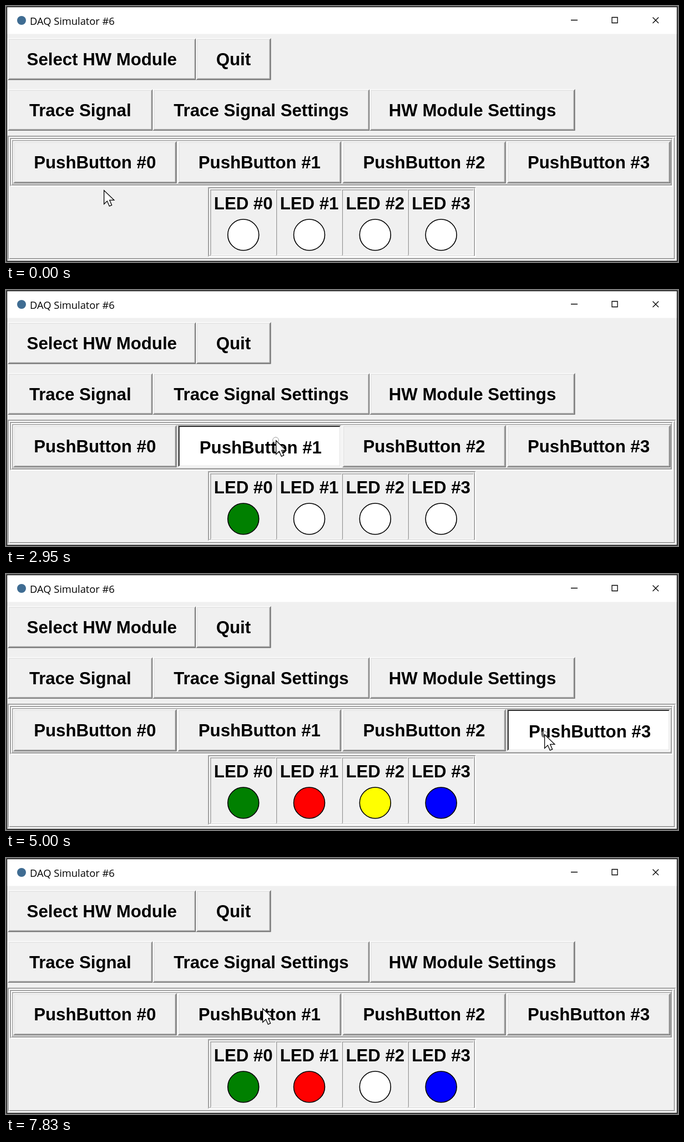
Write an HTML page that moves like this. It is 1211 px wide and 462 px high and loops after 8000 ms.

```html
<!DOCTYPE html>
<html lang="en">
<head>
<meta charset="utf-8">
<title>DAQ Simulator</title>
<style>
  html, body { margin: 0; width: 100%; height: 100%; overflow: hidden; background: #f0f0f0; }
  svg { display: block; width: 100%; height: 100%; }
  .label { font: bold 31.2px "Liberation Sans", Arial, sans-serif; text-anchor: middle; }
  .title { font: 18.3px "Open Sans", "Noto Sans", sans-serif; }
  .led { stroke: #000; stroke-width: 1.6; }
  .glyph { fill: none; stroke: #000; stroke-width: 1.3; }
</style>
</head>
<body>
<svg id="stage" viewBox="0 0 1211 462"></svg>
<script>
const LOOP = 8000;
const GRAY = '#a0a0a0', DARK = '#696969', LIGHT = '#e3e3e3', FACE = '#f0f0f0';
const LED_COLORS = ['#008000', '#ff0000', '#ffff00', '#0000ff'];
const stage = document.getElementById('stage');

// Mitred border of thickness t: one colour top/left, another bottom/right.
function bevel(x, y, w, h, t, topLeft, bottomRight) {
  const r = x + w, b = y + h;
  return `<path fill="${topLeft}" d="M${x} ${b}V${y}H${r}l${-t} ${t}H${x + t}V${b - t}z"/>` +
    `<path fill="${bottomRight}" d="M${r} ${y}V${b}H${x}l${t} ${-t}H${r - t}V${y + t}z"/>`;
}

const groove = (x, y, w, h, t) =>
  bevel(x, y, w, h, t, GRAY, '#fff') + bevel(x + t, y + t, w - 2 * t, h - 2 * t, t, '#fff', GRAY);

const label = (x, y, s) => `<text class="label" x="${x}" y="${y}">${s}</text>`;

function button(x, y, w, h, text, down = false) {
  const t = 1.5, shift = down ? 2 : 0;
  const [outTL, outBR, inTL, inBR] = down
    ? [GRAY, '#fff', '#000', LIGHT]
    : ['#fff', DARK, LIGHT, GRAY];
  return `<rect x="${x}" y="${y}" width="${w}" height="${h}" fill="${down ? '#fff' : FACE}"/>` +
    bevel(x, y, w, h, t, outTL, outBR) +
    bevel(x + t, y + t, w - 2 * t, h - 2 * t, t, inTL, inBR) +
    label(x + w / 2 + shift, y + h / 2 + 11.2 + shift, text);
}

function pushButton(i) {
  const x = 13 + 296.6 * i;
  const make = down => button(x, 244, 294.5, 76, `PushButton #${i}`, down);
  return `<g id="up${i}">${make(false)}</g><g id="down${i}">${make(true)}</g>`;
}

function ledCell(i) {
  const x = 368 + 118.8 * i, cx = x + 59.7;
  return bevel(x, 331, 118.8, 119.5, 1.5, GRAY, '#fff') +
    label(cx, 367, `LED #${i}`) +
    `<circle id="led${i}" class="led" cx="${cx}" cy="413" r="28"/>`;
}

const four = [0, 1, 2, 3];
stage.innerHTML = `
  <rect width="1211" height="462" fill="${FACE}"/>
  <rect width="1211" height="50.5" fill="#fff"/>
  <circle cx="28" cy="26" r="8" fill="#3f6c92"/>
  <text class="title" x="43" y="33.5">DAQ Simulator #6</text>
  <path class="glyph" d="M1018 25.5h12M1092 20.5h10v10h-10zM1165.5 20.5l10.5 10.5m0-10.5l-10.5 10.5"/>
  ${button(3, 58, 339.5, 75.5, 'Select HW Module')}
  ${button(342.5, 58, 135, 75.5, 'Quit')}
  ${button(3, 150, 261.5, 75, 'Trace Signal')}
  ${button(264.5, 150, 391, 75, 'Trace Signal Settings')}
  ${button(655.5, 150, 370, 75, 'HW Module Settings')}
  ${groove(3, 234, 1204.5, 225, 2)}
  ${groove(7, 238, 1195, 88, 2)}
  ${bevel(11, 242, 1188, 81, 1.5, GRAY, GRAY)}
  ${four.map(pushButton).join('')}
  ${groove(364, 327, 483, 126, 2)}
  ${four.map(ledCell).join('')}
  <rect x="1.2" y="1.2" width="1208.6" height="459.6" fill="none" stroke="#222" stroke-width="2"/>
  <g id="cursor">
    <circle id="ring" r="5.3" fill="#fff" fill-opacity=".4" stroke="#999"/>
    <path d="M.6 .8V25.4L6.3 20L10.3 29.2L14.6 27.3L10.7 18.3H18.8z" fill="#fff" stroke="#000" stroke-width="1.3"/>
  </g>`;

const el = id => document.getElementById(id);
const cursor = el('cursor'), ring = el('ring');

// start, last step, number of steps, destination
const START = [176, 332];
const MOVES = [
  [920, 920, 1, 172, 329],
  [1320, 1320, 1, 133, 280],
  [1480, 1480, 1, 132, 279],
  [2340, 2660, 5, 486, 271],
  [3500, 3660, 3, 762, 279],
  [4660, 4830, 3, 970, 289],
  [6340, 6660, 6, 759, 274],
  [7480, 7830, 5, 462, 271]
];

// button, ring on, ring off, pressed, released, LED change
const CLICKS = [
  [0, 2030, 2180, 2030, 2260, 2100],
  [1, 2950, 3250, 2950, 3250, 3030],
  [2, 3890, 4370, 3890, 4490, 3890],
  [3, 4910, 6060, 4910, 6200, 5000],
  [2, 6990, 7300, 7070, 7390, 7070]
];

const ease = u => u * u * (3 - 2 * u);

function cursorAt(t) {
  let [x, y] = START;
  for (const [t0, t1, steps, toX, toY] of MOVES) {
    if (t < t0) break;
    const gap = steps > 1 ? (t1 - t0) / (steps - 1) : 1;
    const done = Math.min(steps, Math.floor((t - t0) / gap + 0.001) + 1);
    const k = ease(done / steps);
    x += (toX - x) * k;
    y += (toY - y) * k;
  }
  return [x, y];
}

const show = (node, on) => node.setAttribute('visibility', on ? 'visible' : 'hidden');

function render(t) {
  const down = [false, false, false, false];
  const lit = [false, false, false, false];
  let touching = false;
  for (const [i, ringOn, ringOff, press, release, toggle] of CLICKS) {
    if (t >= ringOn && t < ringOff) touching = true;
    if (t >= press && t < release) down[i] = true;
    if (t >= toggle) lit[i] = !lit[i];
  }
  for (const i of four) {
    show(el('up' + i), !down[i]);
    show(el('down' + i), down[i]);
    el('led' + i).setAttribute('fill', lit[i] ? LED_COLORS[i] : '#fff');
  }
  show(ring, touching);
  cursor.setAttribute('transform', `translate(${cursorAt(t)})`);
}

const begin = performance.now();
function tick() {
  render((performance.now() - begin) % LOOP);
  requestAnimationFrame(tick);
}
tick();
</script>
</body>
</html>
```
